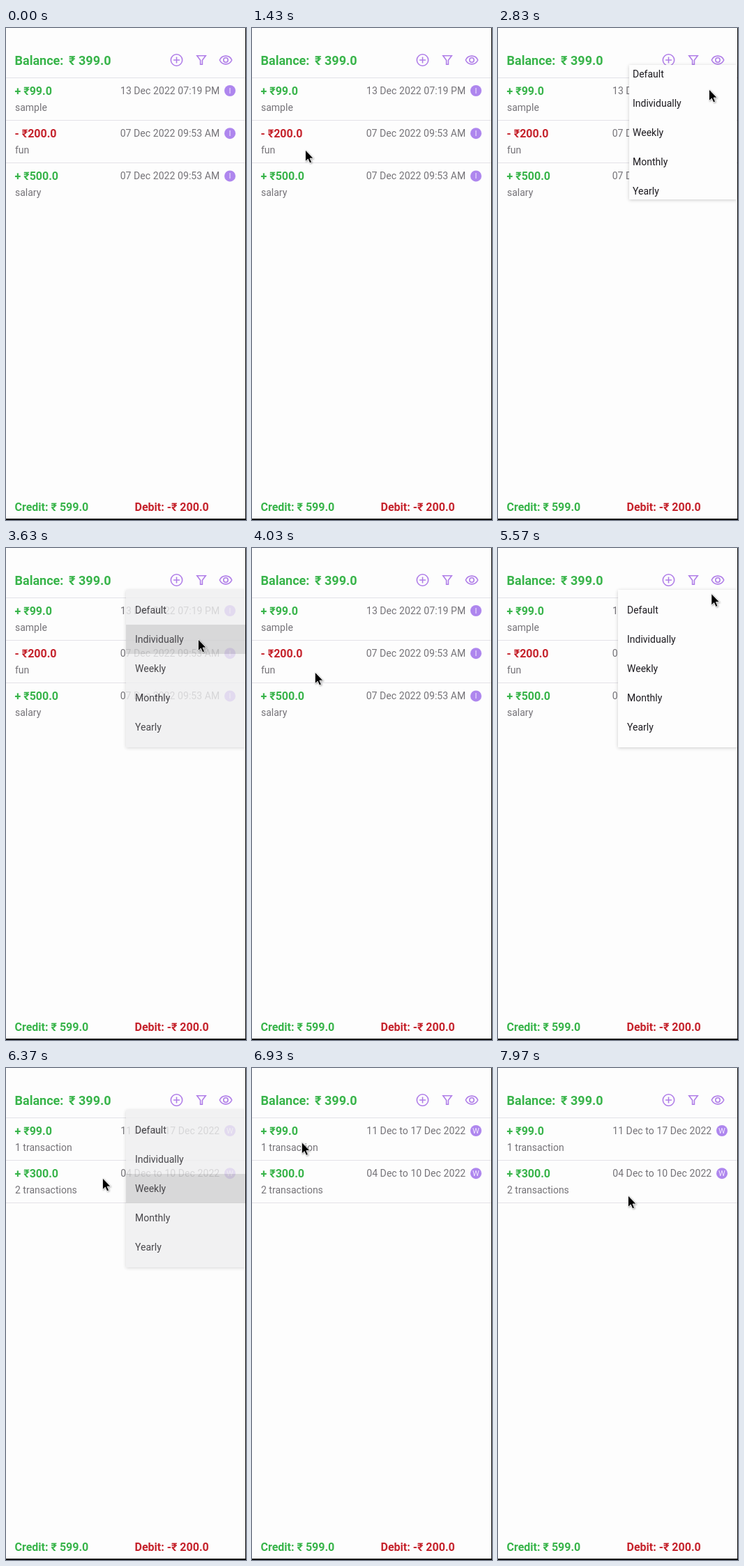
An HTML page for the animation above (8000 ms loop, 344 px wide and 706 px high).

```html
<!DOCTYPE html>
<html lang="en">
<head>
<meta charset="utf-8">
<title>Balance</title>
<style>
html, body { margin: 0; width: 100%; height: 100%; overflow: hidden; background: #fdfdfd; }
body { position: relative; font: 14px Roboto, "Noto Sans", sans-serif; }
svg { position: absolute; left: 0; top: 0; }
text { fill: #757378; }
.b { font-size: 16px; font-weight: 700; }
.title { font-size: 18px; }
.date { letter-spacing: .07px; }
.badge { font-size: 11px; fill: #f4ecff; }
.credit { fill: #38b44a; }
.debit { fill: #c5222b; }
.icon { fill: none; stroke: #b07ee8; stroke-width: 1.6; }
#menu { position: absolute; overflow: hidden; box-shadow: 0 1px 5px rgba(0, 0, 0, .2); }
#items { position: absolute; width: 172px; }
#items div { height: 42px; line-height: 42px; padding-left: 13px; color: #1d1b20; }
</style>
</head>
<body>
<svg width="344" height="706">
  <text class="b title credit" x="12.5" y="52.5">Balance:</text>
  <text class="b title credit" x="90" y="52.5">₹ 399.0</text>
  <g class="icon">
    <circle cx="244.5" cy="46" r="8.2"/>
    <path d="M244.5 41.5v9M240 46h9"/>
    <path d="M273.8 39.8h12.4l-4.8 6.4v6h-2.8v-6z"/>
    <path d="M306.3 46c3.4-7.8 14-7.8 17.4 0c-3.4 7.8-14 7.8-17.4 0z"/>
    <circle cx="315" cy="46" r="3.2"/>
  </g>
  <g id="list"></g>
  <text class="b credit" x="12.5" y="692.5">Credit: ₹ 599.0</text>
  <text class="b debit" x="184.5" y="692.5">Debit: -₹ 200.0</text>
</svg>
<div id="menu"><div id="items"></div></div>
<svg width="344" height="706">
  <path d="M343 0h1v706h-344v-2h343z" fill="#0a0a0a"/>
  <path id="cursor" d="M0 0V16.5L3.8 13L6.3 18.8L9 17.6L6.5 12H11.5Z" stroke="#fff" stroke-width=".8"
    style="filter:drop-shadow(1px 1px 1px rgba(0,0,0,.35))"/>
</svg>
<script>
const LOOP = 8000, FADE = 150, ROW = 61.2;
const $ = id => document.getElementById(id);
const clamp = v => Math.max(0, Math.min(1, v));
const mix = (a, b, u) => a + (b - a) * u;

function listMarkup(badge, rows) {
  const line = i => `<path d="M0 ${Math.round(71.5 + i * ROW) - .5}H343" stroke="#e3e2e8"/>`;
  return [0, 1, 2].map(line).join('') + rows.map(([amount, note, date], i) => {
    const y = 90 + i * ROW;
    const kind = amount[0] === '+' ? 'credit' : 'debit';
    return `<text class="b ${kind}" x="12.5" y="${y + 6}">${amount}</text>
      <text x="13" y="${y + 29}">${note}</text>
      <text class="date" x="306.3" y="${y + 5}" text-anchor="end">${date}</text>
      <circle cx="321" cy="${y}" r="8" fill="#ae86ee"/>
      <text class="badge" x="321" y="${y + 3.8}" text-anchor="middle">${badge}</text>`;
  }).join('');
}

const single = listMarkup('I', [
  ['+ ₹99.0', 'sample', '13 Dec 2022 07:19 PM'],
  ['- ₹200.0', 'fun', '07 Dec 2022 09:53 AM'],
  ['+ ₹500.0', 'salary', '07 Dec 2022 09:53 AM'],
]);
const weekly = listMarkup('W', [
  ['+ ₹99.0', '1 transaction', '11 Dec to 17 Dec 2022'],
  ['+ ₹300.0', '2 transactions', '04 Dec to 10 Dec 2022'],
]);

$('items').innerHTML = ['Default', 'Individually', 'Weekly', 'Monthly', 'Yearly']
  .map(name => `<div>${name}</div>`).join('');

const menus = [
  { open: 2755, close: 3600, pick: 1 },
  { open: 5390, close: 6340, pick: 2 },
];

// Pointer stops
const stops = [
  { t: 30, x: 343, y: 330 },
  { t: 600, x: 20, y: 50 },
  { t: 1430, x: 77, y: 175 },
  { t: 2450, x: 318, y: 46 },
  { t: 2740, x: 316, y: 50 },
  { t: 2830, x: 303, y: 88 },
  { t: 3630, x: 276, y: 131 },
  { t: 3950, x: 70, y: 190 },
  { t: 4400, x: 319, y: 48 },
  { t: 5390, x: 319, y: 48 },
  { t: 6150, x: 230, y: 172 },
  { t: 6370, x: 139, y: 158 },
  { t: 6780, x: 20, y: 110 },
  { t: 7300, x: 277, y: 93 },
  { t: 7730, x: 277, y: 93 },
  { t: 7970, x: 187, y: 183 },
];

function pointer(t) {
  const i = stops.findIndex(s => s.t > t);
  const b = stops.at(i), a = i < 0 ? b : stops[i - 1];
  const u = clamp((t - a.t) / (b.t - a.t || 1)), e = u * u * (3 - 2 * u);
  return [mix(a.x, b.x, e) - .5, mix(a.y, b.y, e)];
}

function drawMenu(t) {
  const m = menus.find(m => t >= m.open && t < m.close + FADE);
  $('menu').style.display = m ? 'block' : 'none';
  if (!m) return;
  const u = clamp((t - m.open) / FADE), q = (1 - u) ** 2;
  const left = 172 + 64 * q, top = 60 - 28 * q;
  const right = 344 - 8 * q, bottom = 286 - 160 * q;
  Object.assign($('menu').style, {
    left: left + 'px', top: top + 'px',
    width: right - left + 'px', height: bottom - top + 'px',
    opacity: Math.min(clamp(u * 2), 1 - clamp((t - m.close) / FADE)),
    background: t >= m.close ? '#efeff0' : '#fdfdfd',
  });
  $('items').style.left = 172 + 32 * q - left + 'px';
  $('items').style.top = 68 - 92 * q - top + 'px';
  [...$('items').children].forEach((item, i) => {
    item.style.background = i === m.pick && t >= m.close - FADE ? 'rgba(0,0,0,.13)' : 'none';
  });
}

let start, shown;
function frame(now) {
  start ??= now;
  const t = (now - start) % LOOP;
  const list = t < menus[1].close ? single : weekly;
  if (list !== shown) $('list').innerHTML = shown = list;
  drawMenu(t);
  $('cursor').style.display = t < stops[0].t ? 'none' : '';
  $('cursor').setAttribute('transform', `translate(${pointer(Math.max(t, stops[0].t))})`);
  requestAnimationFrame(frame);
}
requestAnimationFrame(frame);
</script>
</body>
</html>
```
